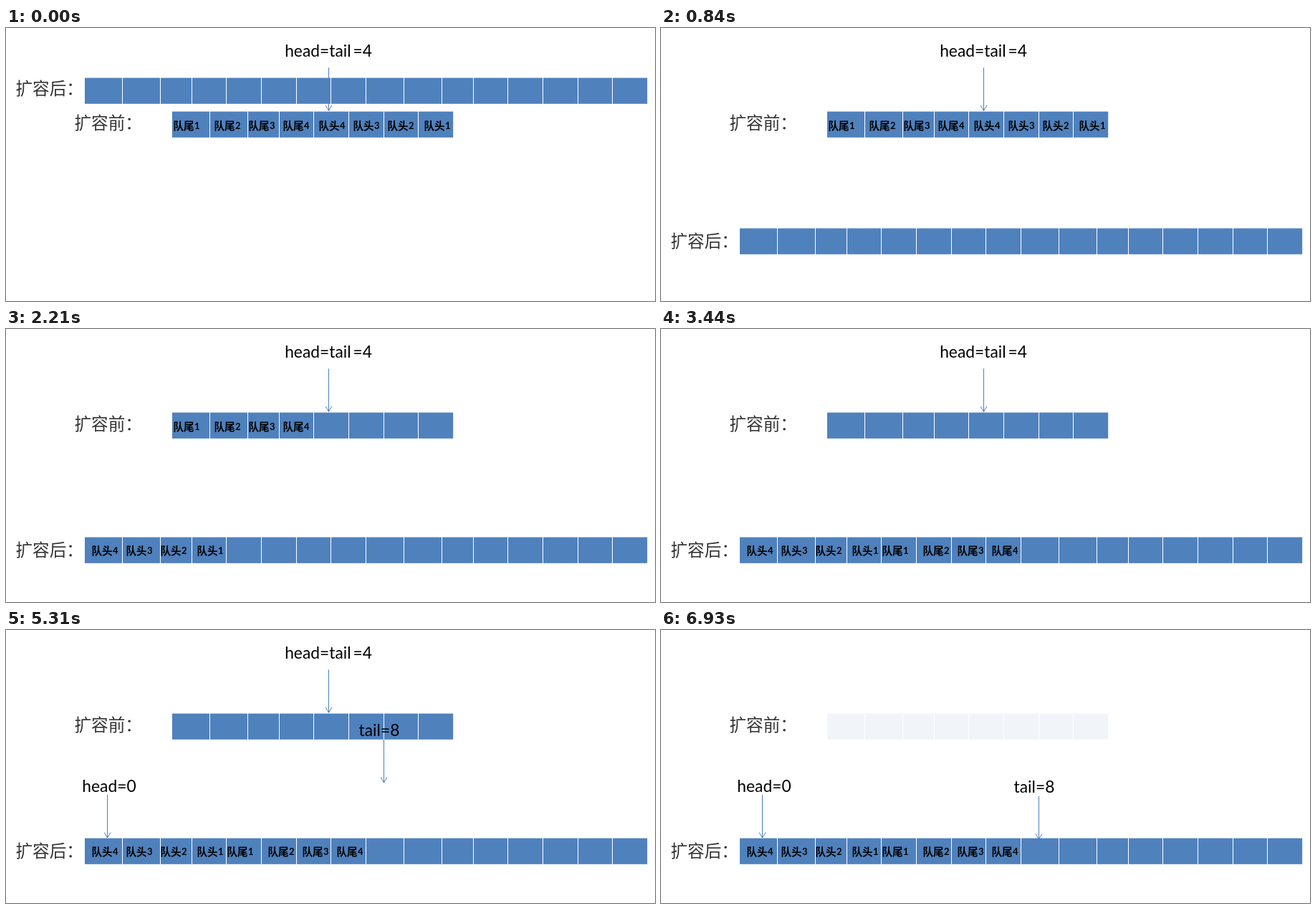
Write an HTML page with a canvas that moves like this. It is 906x381 px and loops after 7.95 s.

```html
<!DOCTYPE html>
<html lang="zh">
<head>
<meta charset="utf-8">
<style>
  html, body { margin: 0; overflow: hidden; background: #fff; }
  canvas { display: block; }
</style>
</head>
<body>
<canvas id="stage" width="906" height="381"></canvas>
<script>
const ctx = document.getElementById('stage').getContext('2d');
const LOOP = 7950, STEP = 77;
const CJK = '"Noto Sans CJK SC", "Noto Sans CJK", sans-serif';
const CELLS = [0, 53, 106, 149.6, 198, 247, 295.7, 344.3], PERIOD = 393;
const HEADS = [[437, 4], [485, 3], [533, 2], [584, 1]];
const TAILS = [[234, 1], [291, 2], [339, 3], [387, 4]];
const clamp = v => Math.max(0, Math.min(1, v));

function text(str, x, y, font, color = '#000') {
  ctx.font = font;
  ctx.fillStyle = color;
  ctx.fillText(str, x, y);
}

function bar(x, y, repeats, alpha = 1) {
  ctx.globalAlpha = alpha;
  ctx.fillStyle = '#4f81bd';
  ctx.fillRect(x + 0.6, y + 0.6, PERIOD * repeats - 0.4, 36.2);
  ctx.globalAlpha = 1;
  ctx.fillStyle = '#fff';
  for (let r = 0; r < repeats; r++)
    for (const c of CELLS) ctx.fillRect(Math.round(x + r * PERIOD + c), y, 1, 37);
}

function title(str, x, centerY) {
  text(str, x, centerY + 7.5, '300 23.6px ' + CJK, '#333');
}

function labels(word, items, dx, dy) {
  for (const [x, n] of items) {
    text(word, x + dx - 0.5, 141.5 + dy, 'bold 14.6px ' + CJK);
    text(n, x + dx + 29, 141 + dy, 'bold 13px Lato, sans-serif');
  }
}

// Caption with an arrow below it; tip is the arrow's end.
function pointer(str, textX, baseline, x, tip, alpha = 1) {
  ctx.globalAlpha = alpha;
  ctx.textAlign = 'center';
  ctx.wordSpacing = '-3px';
  text(str, textX, baseline, '22.8px Lato, sans-serif');
  ctx.textAlign = 'left';
  ctx.strokeStyle = '#4a7ebb';
  ctx.beginPath();
  ctx.moveTo(x, tip - 60);
  ctx.lineTo(x, tip);
  ctx.moveTo(x - 4.5, tip - 7.5);
  ctx.lineTo(x, tip);
  ctx.lineTo(x + 4.5, tip - 7.5);
  ctx.stroke();
  ctx.globalAlpha = 1;
}

// Caption and arrow dropping in from above the stage.
function dropIn(progress, ...args) {
  if (progress <= 0) return;
  ctx.save();
  ctx.translate(0, Math.round(-291 * (1 - clamp(progress))));
  pointer(...args);
  ctx.restore();
}

function draw(k) {
  ctx.clearRect(0, 0, 906, 381);

  bar(231, 116, 1, Math.max(0.08, clamp(1 - (k - 80) * 0.092)));
  title('扩容前：', 95.5, 133.5);
  pointer('head=tail =4', 450, 40, 450.5, 115.3, clamp(1 - (k - 72) * 0.12));

  // Moving labels slide behind the lower bar, then reappear on it.
  const h = Math.max(0, k - 11), t = Math.max(0, k - 29);
  if (k < 23) labels('队头', HEADS, -24.8 * h, 14.36 * h);
  if (k < 39) labels('队尾', TAILS, 6.8 * t, 16.2 * t);

  const y = Math.min(290, Math.round(65.6 + 19.4 * k));
  bar(109, Math.max(69, y), 2);
  title('扩容后：', 13.5, y + 19);
  if (k >= 29) labels('队头', HEADS, -317, 173);
  if (k >= 45) labels('队尾', TAILS, 75, 173);

  dropIn((k - 48) / 10, 'head=0', 144, 226, 141.5, 290);
  dropIn((k - 61) / 11, 'tail=8', 521, 227, 527.5, 292);
}

function tick(now) {
  draw(Math.floor((now % LOOP) / STEP + 0.33));
  requestAnimationFrame(tick);
}
requestAnimationFrame(tick);
</script>
</body>
</html>
```
